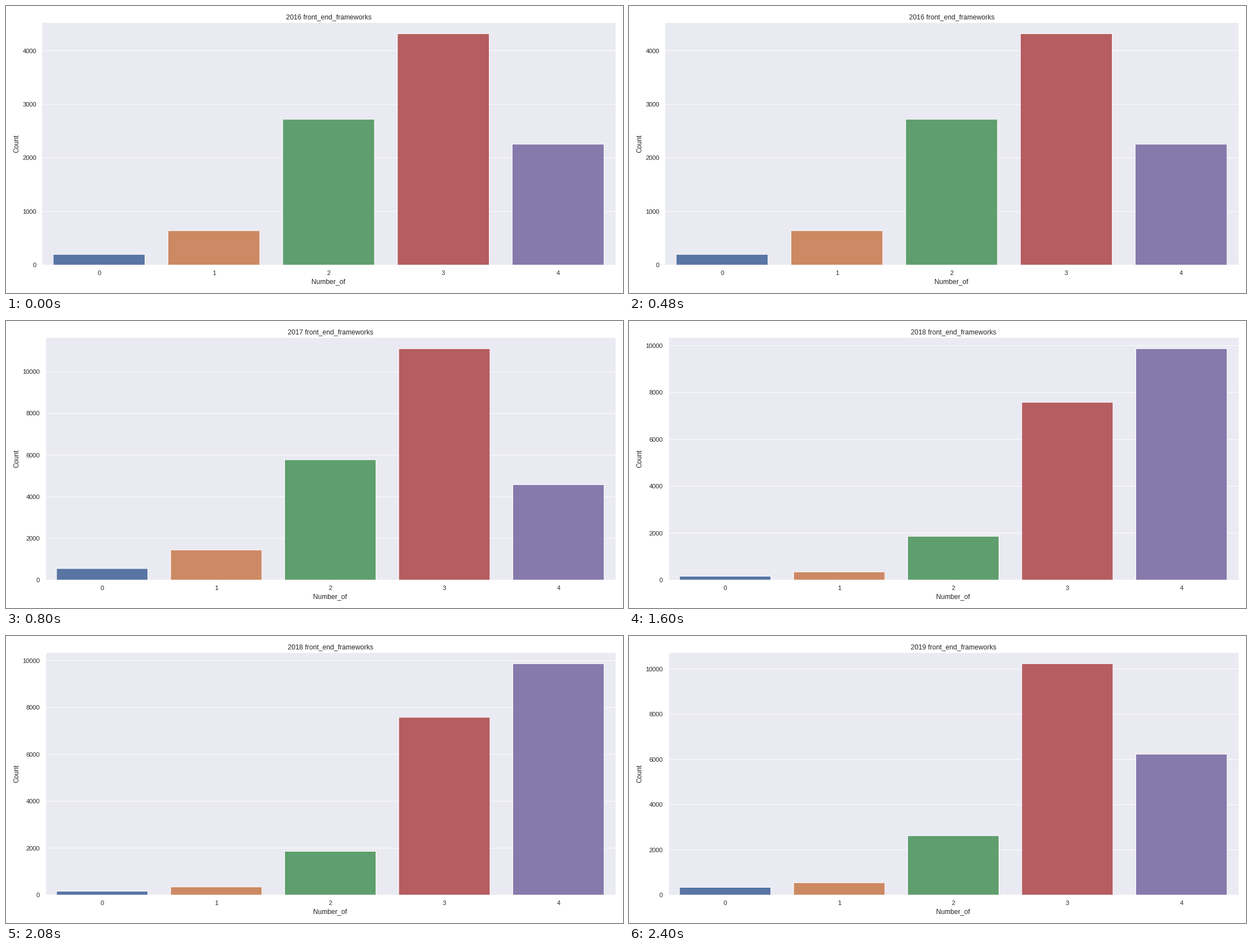
Write a matplotlib script that moves like this. It is 1095 px wide and 511 px high and loops after 3200 ms.

```python
import matplotlib.pyplot as plt
from matplotlib.animation import FuncAnimation

W, H, DPI = 1095, 511, 73
RIGHT, TOP, BOTTOM = 1081.6, 28.7, 461.3
LABEL_SPACE, DIGIT = 39, 6.1  # left margin without and per tick label digit
FIRST_YEAR = 2016

COLORS = ["#5875a4", "#cc8963", "#5f9e6e", "#b55d60", "#857aab"]
COUNTS = [
    (200, 642, 2720, 4317, 2256),
    (553, 1443, 5775, 11105, 4580),
    (165, 347, 1868, 7580, 9867),
    (343, 546, 2624, 10230, 6231),
]

INK = "#262626"
plt.rcParams.update({
    "font.family": "Liberation Sans",
    "font.size": 12,
    "axes.titlesize": 12,
    "axes.labelsize": 12,
    "xtick.labelsize": 11,
    "ytick.labelsize": 11,
    "text.color": INK,
    "axes.labelcolor": INK,
    "xtick.color": INK,
    "ytick.color": INK,
    "axes.facecolor": "#eaeaf2",
    "axes.edgecolor": "white",
    "axes.linewidth": 1.25,
    "axes.axisbelow": True,
    "grid.color": "white",
    "grid.linewidth": 1,
    "xtick.bottom": False,
    "ytick.left": False,
    "xtick.major.size": 6,
    "ytick.major.size": 6,
})

fig = plt.figure(figsize=(W / DPI, H / DPI), dpi=DPI, facecolor="white")
ax = fig.add_axes([0.1, 0.1, 0.8, 0.8])


def draw(i):
    counts = COUNTS[i]
    top = max(counts) * 1.05
    left = LABEL_SPACE + DIGIT * len(str(int(top)))
    ax.clear()
    ax.set_position([left / W, 1 - BOTTOM / H,
                     (RIGHT - left) / W, (BOTTOM - TOP) / H])
    ax.bar(range(len(counts)), counts, width=0.8, color=COLORS,
           edgecolor="white", linewidth=1, snap=False)
    ax.set_xlim(-0.5, len(counts) - 0.5)
    ax.set_ylim(0, top)
    ax.grid(axis="y", snap=False)
    ax.set_title(f"{FIRST_YEAR + i} front_end_frameworks")
    ax.set_xlabel("Number_of")
    ax.set_ylabel("Count")
    return ax.patches


anim = FuncAnimation(fig, draw, frames=len(COUNTS), interval=800,
                     init_func=lambda: draw(0), repeat=True, repeat_delay=0)
plt.show()
```
